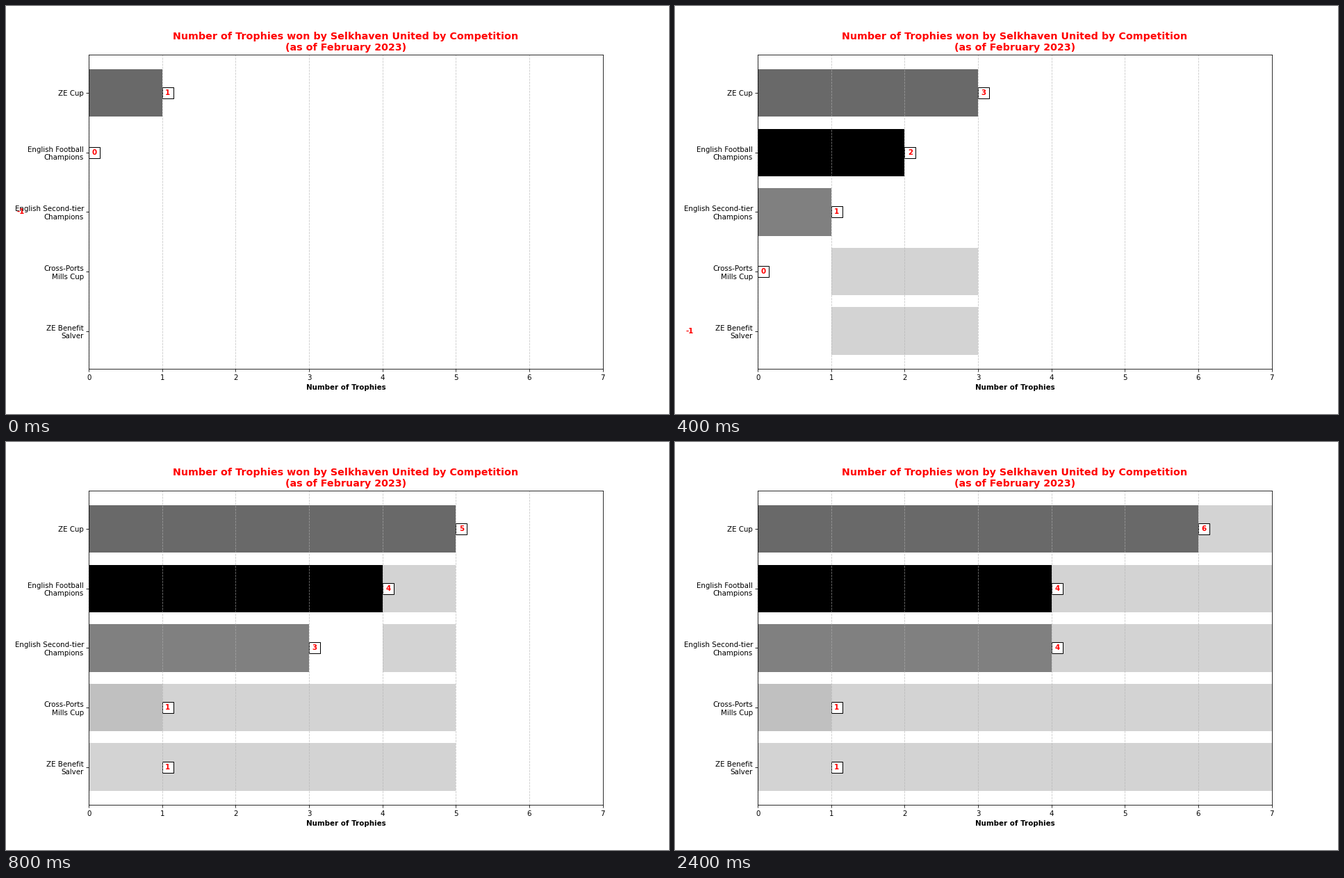
Animation, 954 px wide and 587 px high, one loop 3200 ms. Source, as a matplotlib script:

```python
import matplotlib.pyplot as plt
import numpy as np
from matplotlib.animation import FuncAnimation

plt.rcParams["font.family"] = "DejaVu Sans"

W, H = 954, 587
DPI = H / 8  # an 8 inch tall figure
STEP_MS, LOOP_MS = 200, 3200
X_MAX = 7
LABEL_DX = 0.075

names = [
    "ZE Cup",
    "English Football\nChampions",
    "English Second-tier\nChampions",
    "Cross-Ports\nMills Cup",
    "ZE Benefit\nSalver",
]
totals = np.array([6, 4, 4, 1, 1])
colors = ["dimgray", "black", "gray", "silver", "lightgray"]
rows = np.arange(len(names))

fig, ax = plt.subplots(figsize=(W / DPI, H / DPI), dpi=DPI)

rest = ax.barh(rows, totals, left=totals, color="lightgray")
bars = ax.barh(rows, totals, color=colors)
boxes = ax.scatter(totals, rows, s=[250] * len(rows), marker="s",
                   facecolors="white", edgecolors="black", linewidths=1)
labels = [ax.text(0, y, "", color="red", weight="bold", size=10,
                  ha="center", va="center") for y in rows]

ax.set_xlim(0, X_MAX)
ax.set_ylim(4.64, -0.64)
ax.set_xticks(range(X_MAX + 1))
ax.set_yticks(rows, names)
ax.grid(axis="x", linestyle="--", alpha=0.7)
ax.set_xlabel("Number of Trophies", weight="bold")
ax.set_title("Number of Trophies won by Selkhaven United by Competition\n"
             "(as of February 2023)", color="red", weight="bold", size=14)


def update(i):
    # Each row starts one step after the row above and stops at its total.
    reach = min(i + 1, X_MAX)
    values = np.minimum(reach - rows, totals)
    for y, value in enumerate(values):
        bars[y].set_width(max(value, 0))
        rest[y].set_width(max(reach - totals[y], 0))
        labels[y].set_x(value + LABEL_DX)
        labels[y].set_text(str(value))
    boxes.set_offsets(np.column_stack([values + LABEL_DX, rows]))
    return [*bars, *rest, boxes, *labels]


anim = FuncAnimation(fig, update, frames=LOOP_MS // STEP_MS,
                     interval=STEP_MS, repeat=True, repeat_delay=0)
plt.show()
```
